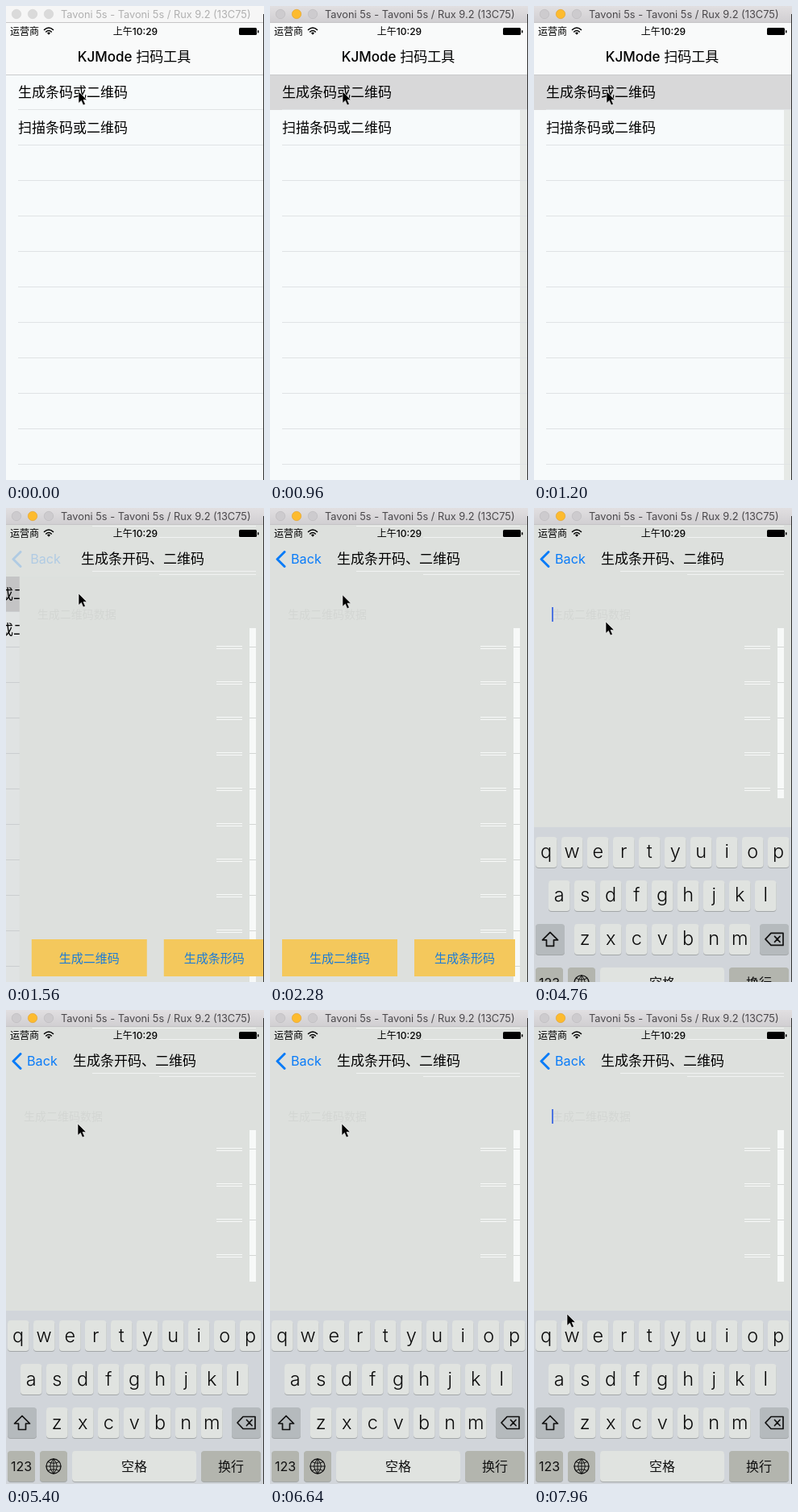
Recreate the animation shown at these times as an HTML page. Size 320 px wide and 588 px high, loop 8 s.

```html
<!DOCTYPE html>
<html lang="zh-CN">
<head>
<meta charset="utf-8">
<title>扫码工具</title>
<style>
html, body { margin: 0; width: 100%; height: 100%; overflow: hidden; background: #dde0dd; }
svg { display: block; width: 100vw; height: 100vh; }
text { font-family: Inter, "Noto Sans CJK SC", "Noto Sans CJK", sans-serif; }
.mid { text-anchor: middle; }
.bold { font-size: 17px; font-weight: 500; }
.key { font-size: 23.5px; font-weight: 300; fill: #0a0a0a; }
</style>
</head>
<body>
<svg id="stage" viewBox="0 0 320 588" xmlns="http://www.w3.org/2000/svg"></svg>
<script>
const LOOP = 8000, ACTIVE = 640, PRESS = 880, PUSH = 1240, TYPE = 4500;
const svg = document.getElementById('stage');

function el(tag, attrs, parent = svg, content) {
  const node = document.createElementNS(svg.namespaceURI, tag);
  for (const k in attrs) node.setAttribute(k, attrs[k]);
  if (content) node.textContent = content;
  parent.append(node);
  return node;
}
const group = (parent = svg) => el('g', {}, parent);
const rect = (x, y, width, height, fill, parent, rx = 0) =>
  el('rect', { x, y, width, height, fill, rx }, parent);
const text = (x, y, str, parent, attrs = {}) =>
  el('text', { x, y, 'font-size': 17, ...attrs }, parent, str);
const stroke = (d, color, width, parent) =>
  el('path', { d, fill: 'none', stroke: color, 'stroke-width': width,
    'stroke-linejoin': 'round', 'stroke-linecap': 'round' }, parent);
const set = (node, k, v) => node.setAttribute(k, v);
const fade = (node, v) => set(node, 'opacity', v);
const move = (node, x, y = 0) => set(node, 'transform', `translate(${x} ${y})`);

// List screen
const list = group();
rect(0, 84, 320, 504, '#f7fafb', list);
const edge = rect(310, 86, 9, 502, '#e6e9e6', list);
const press = rect(0, 85, 320, 44, '#d8d8d9', list);
for (let y = 128; y < 588; y += 44) rect(15, y, 305, 1, '#e0e3e5', list);
text(15, 113, '生成条码或二维码', list);
text(15, 157, '扫描条码或二维码', list);
const shade = rect(0, 84, 320, 504, '#000');

// Form screen, with pale fixed traces behind its controls
const paper = rect(0, 84, 320, 504, '#dde0dd');
const traceClip = rect(0, 0, 320, 588, '#fff', el('clipPath', { id: 'trace' }));
const traces = el('g', { 'clip-path': 'url(#trace)' });
rect(302, 149, 8, 439, '#f7f9f8', traces);
for (let y = 172; y < 588; y += 44) {
  rect(261, y - 1, 32, 1, '#f7f9f8', traces);
  rect(261, y + 2, 32, 1, '#f7f9f8', traces);
  rect(302, y, 8, 1, '#d3d6d4', traces);
}
const form = group();
text(22, 137, '生成二维码数据', form, { 'font-size': 14, fill: '#d3d6d3' });
function button(x, width, label) {
  rect(x, 535, width, 46, '#f4c85c', form);
  text(x + width / 2, 563.5, label, form, { class: 'mid', 'font-size': 15, fill: '#1d7cd6' });
}
button(15, 143, '生成二维码');
button(179, 125, '生成条形码');
const caret = rect(22, 123, 2, 18, '#4d74e0', form);

// Navigation and status bars
rect(0, 20, 320, 65, '#f9fafa');
const navTint = rect(0, 20, 320, 65, '#dde0dd');
const navLine = rect(0, 85, 320, 1, '#c9cbcc');
const navTrace = group();
[[107, 22, 203], [190, 36, 120], [107, 78, 203], [190, 82, 120]]
  .forEach(([x, y, w]) => rect(x, y, w, 1, '#f1f3f2', navTrace));
const oldTitle = text(159, 69, 'KJMode 扫码工具', svg, { class: 'mid bold' });
const newTitle = text(159.5, 69, '生成条开码、二维码', svg, { class: 'mid bold' });
const back = group();
stroke('M18 54.5L9 63.5L18 72.5', '#0a7cf8', 3, back);
const backLabel = text(26, 69, 'Back', back, { 'font-size': 16.2, fill: '#0a7cf8' });
text(5, 35.5, '运营商', svg, { 'font-size': 12 });
stroke('M47.5 29.5Q53 24.5 58.5 29.5M49.7 32Q53 29 56.3 32', '#000', 1.6);
el('path', { d: 'M51 33.4Q53 31.8 55 33.4L53 35.8Z' });
text(160.5, 35.5, '上午10:29', svg, { class: 'mid', 'font-size': 12, 'font-weight': 500 });
rect(289, 27, 22, 9, '#000', svg, 1.5);
rect(312, 30, 1.5, 3.5, '#000', svg, 0.7);

// Keyboard, drawn at its resting place
const board = group();
rect(0, 373, 320, 215, '#d1d5da', board);
function key(x, y, w, fill = '#e0e3e0') {
  rect(x, y + 1, w, 38, '#a3a7a8', board, 4);
  rect(x, y, w, 38, fill, board, 4);
}
[['qwertyuiop', 2], ['asdfghjkl', 18], ['zxcvbnm', 50]].forEach(([row, x0], r) =>
  [...row].forEach((ch, i) => {
    const x = x0 + i * 32, y = 385 + r * 54;
    key(x, y, 26.5);
    text(x + 13.2, y + 26.5, ch, board, { class: 'mid key' });
  }));
key(2, 493, 36, '#b5babd');
stroke('M20 503.5L10.5 513H15.5V520.5H24.5V513H29.5Z', '#111', 1.7, board);
key(280, 493, 36, '#b5babd');
stroke('M287 512L294 504.5H309V519.5H294ZM298.5 508.5L305 515.5M305 508.5L298.5 515.5', '#111', 1.7, board);
key(2, 547, 34, '#b3b5ae');
key(42, 547, 34, '#b3b5ae');
key(82, 547, 154);
key(242, 547, 74, '#b3b5ae');
[[19, '123'], [159, '空格'], [279, '换行']].forEach(([x, s]) =>
  text(x, 572, s, board, { class: 'mid', 'font-size': 16, fill: '#111' }));
el('circle', { cx: 59, cy: 566, r: 9, fill: 'none', stroke: '#111', 'stroke-width': 1.3 }, board);
stroke('M50 566H68M59 557V575M52 560.5Q59 564 66 560.5M52 571.5Q59 568 66 571.5' +
  'M59 557Q50 566 59 575M59 557Q68 566 59 575', '#111', 1, board);

// Window frame
const grad = el('linearGradient', { id: 'bar', x2: 0, y2: 1 });
el('stop', { offset: 0, 'stop-color': '#e1dfe1' }, grad);
el('stop', { offset: 1, 'stop-color': '#d0ced1' }, grad);
const bar = rect(0, 0, 320, 21, '#f6f6f6');
rect(0, 20, 320, 1, '#c6c5c7');
const lights = [13, 33, 53].map(cx =>
  el('circle', { cx, cy: 10, r: 5.7, 'stroke-width': 0.6 }));
const caption = text(68, 14.8, 'Tavoni 5s - Tavoni 5s / Rux 9.2 (13C75)', svg, { 'font-size': 12.8 });
rect(319, 10, 1, 578, '#333');

const pointer = el('path', {
  d: 'M0 0V14.5L3.4 11.4L5.8 17L8.4 15.8L6 10.4H10.4Z',
  fill: '#000', stroke: '#fff', 'stroke-width': 0.6
});

const clamp = v => Math.min(1, Math.max(0, v));
const ease = v => { v = clamp(v); return v * v * (3 - 2 * v); };
// Critically damped spring: share of the way still to go
function rest(ms) {
  const s = Math.max(0, ms) * 0.0146;
  return (1 + s) * Math.exp(-s);
}

// Stops: start, end, x, y
const stops = [[2200, 2800, 89, 141], [7000, 7640, 41, 377]];
function pointerAt(t) {
  let x = 90, y = 106;
  for (const [a, b, nx, ny] of stops) {
    const k = ease((t - a) / (b - a));
    x += (nx - x) * k;
    y += (ny - y) * k;
  }
  return [x, y];
}

function draw(t) {
  const active = t >= ACTIVE;
  set(bar, 'fill', active ? 'url(#bar)' : '#f6f6f6');
  set(caption, 'fill', active ? '#4a484b' : '#b0b0b0');
  lights.forEach((c, i) => {
    const lit = active && i === 1;
    set(c, 'fill', lit ? '#fdbb2e' : active ? '#cdcbce' : '#dadada');
    set(c, 'stroke', lit ? '#e0a02a' : active ? '#b9b7ba' : '#d2d2d2');
  });
  fade(press, +(t >= PRESS));
  fade(edge, +active);

  const left = rest(t - PUSH), done = 1 - left;
  move(list, -96 * done);
  fade(shade, 0.1 * done);
  move(paper, 320 * left);
  move(form, 320 * left);
  fade(traces, +(left < 0.15));
  fade(navTrace, +(left < 0.15));
  fade(navTint, done);
  fade(navLine, left);
  move(oldTitle, -110 * done);
  fade(oldTitle, clamp(1 - 2 * done));
  move(newTitle, 190 * left);
  fade(newTitle, clamp(1.4 * done - 0.3));
  fade(back, clamp(1 - 15 * left));
  move(backLabel, 80 * left);

  const drop = 215 * rest(t - TYPE);
  move(board, 0, drop);
  set(traceClip, 'height', t < TYPE ? 588 : 337 + drop);
  const blink = (t + 320) % 1000 < 500;
  fade(caret, +(t >= TYPE && (t < 5180 || blink)));

  move(pointer, ...pointerAt(t));
}

function tick(now) {
  draw(now % LOOP);
  requestAnimationFrame(tick);
}
draw(0);
requestAnimationFrame(tick);
</script>
</body>
</html>
```
